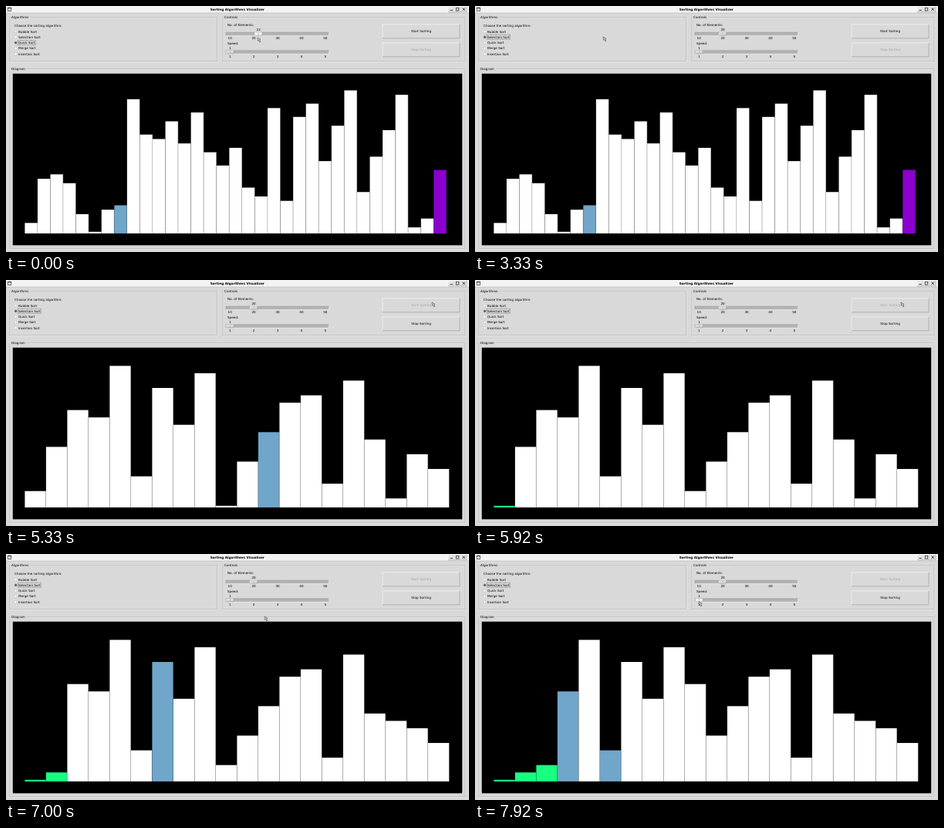
An HTML page that plays this animation: 600x319 px, repeating every 8 s.

```html
<!DOCTYPE html>
<html lang="en">
<head>
<meta charset="utf-8">
<title>Sorting Algorithms Visualizer</title>
<style>
  html, body { margin: 0; width: 100%; height: 100%; overflow: hidden; background: #d9d9d9; }
  svg { display: block; width: 600px; height: 319px; }
  text { font: 4.13px "DejaVu Sans", sans-serif; white-space: pre; }
</style>
</head>
<body>
<svg id="stage" viewBox="0 0 600 319"></svg>
<script>
const FPS = 12, TICKS = 96, BASE = 294.9, LEFT = 24.4;
const BLUE = '#70a6ca', GREEN = '#18ff82', PURPLE = '#8a00ce';

// The two shuffled data sets, as ranks from left to right
const firstRun = [2, 12, 13, 11, 4, 0, 5, 6, 30, 22, 21, 25, 20, 27, 18, 15, 19, 10, 8, 28, 7,
  26, 29, 16, 24, 32, 9, 17, 23, 31, 1, 3, 14];
const secondRun = [2, 8, 13, 12, 19, 4, 16, 11, 18, 0, 6, 10, 14, 15, 3, 17, 9, 1, 7, 5];

// Selection sort: when the run appears, when each pass scans, and how fast
const RUN = 58, PASSES = [61.66, 78.9, 83.25, 94.6], SPEED = 4.4, PAUSE = 4;

// Pointer moves: [start tick, end tick, x, y]
const moves = [
  [0, 0, 326, 41], [2, 10, 320, 41], [17, 18, 446, 31], [18, 21, 545, 35], [22, 26, 166, 40],
  [27, 32, 22, 38], [39, 40, 166, 40], [40, 42, 325, 57], [44, 52, 552, 29],
  [78, 84, 335, 81], [89, 95, 290, 62]
];

const rect = (x, y, w, h, fill, extra = '') =>
  `<rect x="${x}" y="${y}" width="${w}" height="${h}" fill="${fill}" ${extra}/>`;
const line = (d, color, width = 0.5) =>
  `<path d="${d}" fill="none" stroke="${color}" stroke-width="${width}"/>`;
const label = (x, y, str, anchor = 'start', fill = '#000', extra = '') =>
  `<text x="${x}" y="${y + 1.6}" text-anchor="${anchor}" fill="${fill}" ${extra}>${str}</text>`;

function bevel(x, y, w, h, fill, sunken = false) {
  const [a, b] = sunken ? ['#888', '#fff'] : ['#fff', '#888'];
  return rect(x, y, w, h, fill) + line(`M${x} ${y + h}V${y}H${x + w}`, a) +
    line(`M${x} ${y + h}H${x + w}V${y}`, b);
}

function group(x, y, w, h, title, titleWidth) {
  const box = (o, color) => rect(x + o, y + o, w, h, 'none', `stroke="${color}" stroke-width=".5"`);
  return box(0.5, '#f4f4f4') + box(0, '#aaa') +
    rect(x + 1.5, y - 2, titleWidth, 4, '#d9d9d9') + label(x + 2, y, title);
}

function pointerAt(tick) {
  let x = 0, y = 0;
  for (const [start, end, toX, toY] of moves) {
    if (tick < start) break;
    const t = Math.min(1, (tick - start) / (end - start || 1));
    const k = end === start ? 1 : t * t * (3 - 2 * t);
    x += (toX - x) * k;
    y += (toY - y) * k;
  }
  return [x, y];
}

function titleBar() {
  const icons = line('M575.5 5.5H579', '#222', 0.8) +
    rect(583.2, 2.5, 3.6, 3.5, 'none', 'stroke="#222" stroke-width=".7"') +
    line('M591.5 2.5L595 6M595 2.5L591.5 6', '#222', 0.9);
  return rect(0, 0, 600, 9, '#f3f3f3') + line('M0 9H600', '#aaa') +
    rect(2.3, 2.3, 4.4, 4, '#fff', 'stroke="#222" stroke-width=".7"') + line('M2.3 2.6H6.7', '#222', 1) +
    [573, 581, 589].map(x => bevel(x, 0.8, 8, 7, '#e4e4e4')).join('') + icons +
    label(299.8, 4.1, 'Sorting Algorithms Visualizer', 'middle', '#000',
      'style="font-weight:bold;font-size:4.25px"');
}

function radios(selected, over) {
  return ['Bubble', 'Selection', 'Quick', 'Merge', 'Insertion'].map((name, i) => {
    const y = 33 + i * 7.25, w = 14 + name.length * 1.8, on = i === selected;
    return (over(10, y - 3.5, w + 6, 7) ? rect(10, y - 3.5, w + 6, 7, '#ececec') : '') +
      `<circle cx="12.6" cy="${y + 0.1}" r="1.6" fill="${on ? '#555' : '#fff'}" stroke="#aaa" stroke-width=".4"/>` +
      label(16, y, name + ' Sort') +
      (on ? rect(15.2, y - 3, w, 6, 'none', 'stroke="#333" stroke-width=".45" stroke-dasharray=".8 .4"') : '');
  }).join('');
}

function slider(y, x, value, ticks, active) {
  return label(x, y - 6, value, 'middle') + bevel(285, y - 2.2, 133.6, 4.4, '#b3b3b3', true) +
    bevel(x - 4.7, y - 1.8, 9.4, 3.6, active ? '#f4f4f4' : '#d9d9d9') +
    line(`M${x} ${y - 1.6}V${y + 1.5}`, '#999') +
    ticks.map((t, i) => label(290.2 + 30.9 * i, y + 4.9, t, 'middle')).join('');
}

function button(y, str, enabled, over, pressed) {
  const hot = enabled && over(488, y, 100, 18);
  return bevel(488, y, 100, 18, hot ? '#ececec' : '#d9d9d9', pressed) +
    label(538, y + 8.9, str, 'middle', enabled ? '#000' : '#a3a3a3');
}

// State of the selection sort: bar order, finished bars and highlighted bars
function sortAt(tick) {
  const ranks = [...secondRun], n = ranks.length;
  for (let i = 0; ; i++) {
    const start = PASSES[i], next = PASSES[i + 1] ?? Infinity;
    const swapAt = Math.min(start + (n - 1 - i) / SPEED + PAUSE, next);
    if (tick < swapAt) {
      if (i && tick < start) return { ranks, sorted: i, marked: [] };
      const j = i + 1 + Math.floor(Math.max(0, tick - start) * SPEED);
      const first = Math.min(...ranks.slice(i, j)) === ranks[i];
      return { ranks, sorted: i, marked: j >= n ? [] : first ? [i, j] : [j] };
    }
    const min = ranks.indexOf(i);
    [ranks[i], ranks[min]] = [ranks[min], ranks[i]];
    if (tick < next) return { ranks, sorted: i + 1, marked: [] };
  }
}

function bars(tick) {
  const running = tick >= RUN;
  const { ranks, sorted, marked } = running ? sortAt(tick) : { ranks: firstRun, sorted: 0, marked: [7] };
  const width = running ? 27.5 : 16.56, unit = running ? 9.55 : 5.73;
  return ranks.map((rank, i) => {
    const x = LEFT + i * width, h = 2.1 + rank * unit;
    const fill = i < sorted ? GREEN : marked.includes(i) ? BLUE : !running && i === 32 ? PURPLE : '#fff';
    return rect(x, BASE - h, width, h, fill) + line(`M${x + width} ${BASE - h}v${h}`, '#000', 0.45);
  }).join('');
}

function pointer(x, y) {
  return `<path transform="translate(${x} ${y})" d="M0 0L.5 4.1L1.5 3.4L2.7 5.8L3.8 5.2L2.7 2.9L4 2.4Z"
    fill="#d8d8d8" stroke="#444" stroke-width=".6"/>`;
}

function draw(tick) {
  const [px, py] = pointerAt(tick);
  const over = (x, y, w, h) => px >= x && px <= x + w && py >= y && py <= y + h;
  const count = tick < 4 ? 22 : tick < 10 ? 21 : 20;
  const running = tick >= RUN;
  stage.innerHTML = rect(0, 0, 600, 319, '#d9d9d9') + titleBar() +
    group(5, 14.3, 268.6, 57.5, 'Algorithms', 24) +
    group(281, 14.3, 314, 57.5, 'Controls', 19) +
    group(5, 81.8, 590, 233, 'Diagram', 20) +
    label(11, 25, 'Choose the sorting algorithm:') +
    radios(tick < 37 ? 2 : 1, over) +
    label(287, 24.1, 'No. of Elements:') +
    slider(36.4, 290 + (count - 10) * 3.1, count, [10, 20, 30, 40, 50], tick < 14) +
    label(287, 48.2, 'Speed:') +
    slider(60, 290.5, 1, [1, 2, 3, 4, 5], over(285.5, 57, 10, 6)) +
    button(23.8, 'Start Sorting', !running, over, tick >= 54 && !running) +
    button(47.8, 'Stop Sorting', running, over, false) +
    rect(8.8, 87.7, 582.4, 222.6, '#000') + bars(tick) + pointer(px, py);
}

const stage = document.getElementById('stage');
let shown = -1;
function frame(now) {
  const tick = Math.floor((now + 8) * FPS / 1000) % TICKS;
  if (tick !== shown) draw(shown = tick);
  requestAnimationFrame(frame);
}
draw(0);
requestAnimationFrame(frame);
</script>
</body>
</html>
```
